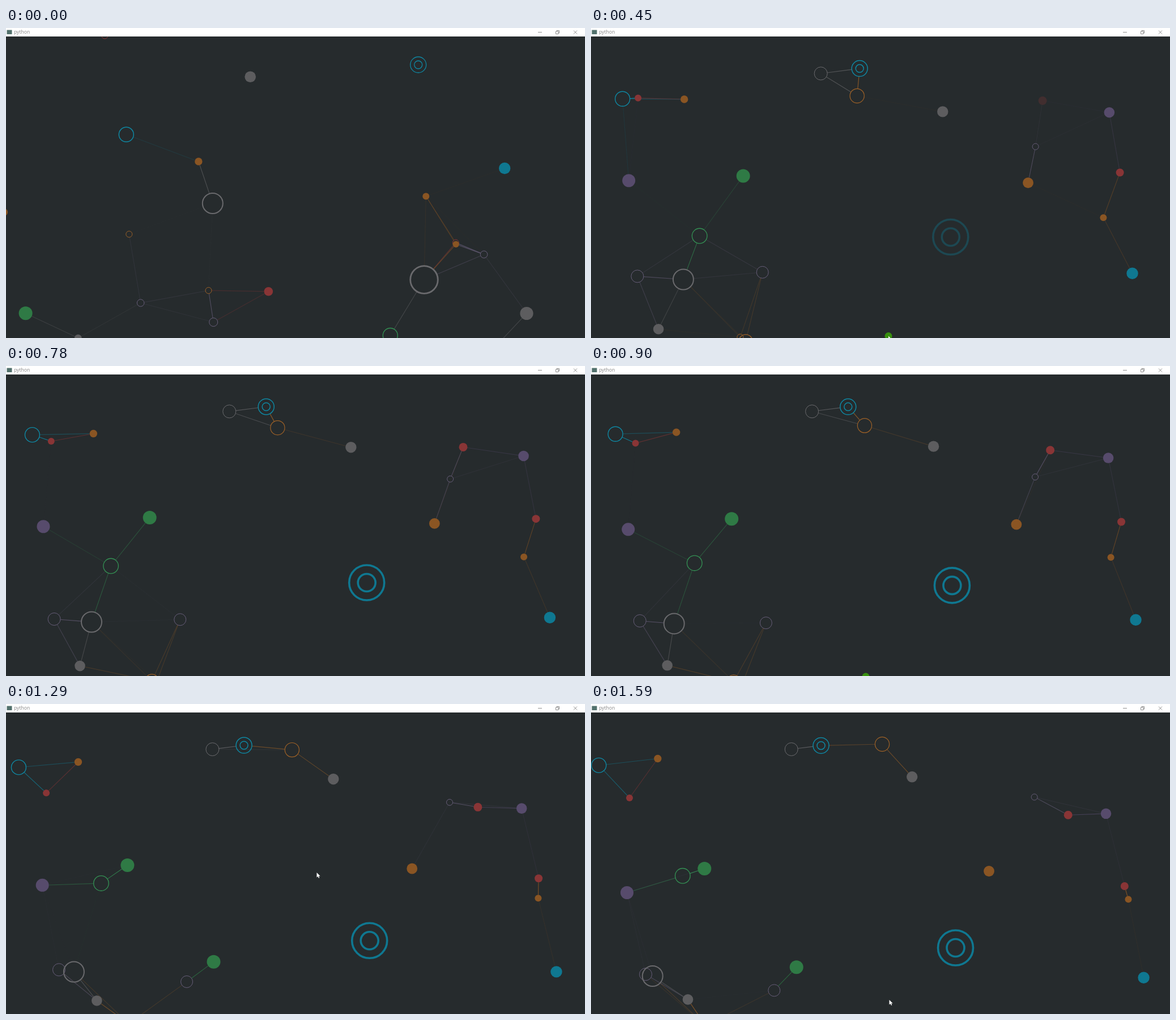
Animation of 1022 by 548 pixels, one loop 1620 ms. Source, as an HTML page with a canvas:

```html
<!DOCTYPE html>
<html lang="en">
<head>
<meta charset="utf-8">
<title>python</title>
<style>
  html, body { margin: 0; width: 100%; height: 100%; overflow: hidden; background: #262b2d; }
  canvas { position: absolute; left: 0; top: 0; }
  .bar { position: absolute; left: 0; top: 0; width: 1022px; height: 15px; background: #fff; }
  .bar span { position: absolute; left: 14px; top: 1px; font: 8.6px/13px "Open Sans", "Noto Sans", sans-serif; color: #858585; }
  .bar svg { position: absolute; left: 0; top: 0; }
</style>
</head>
<body>
<canvas id="stage" width="1022" height="548"></canvas>
<div class="bar">
  <svg width="1022" height="15" fill="none" stroke="#858585" stroke-width="0.9">
    <rect x="1.5" y="3.5" width="9" height="7.5" fill="#52716c" stroke="none"/>
    <path d="M939 7.5h7M970.5 6h4.5v4.5h-4.5zM972 6v-1.5h4.5v4.5h-1.5M1002 4.5l6 6M1008 4.5l-6 6"/>
  </svg>
  <span>python</span>
</div>
<script>
const ctx = document.getElementById('stage').getContext('2d');
const LOOP = 1620, STEP = 30, SPAN = 59.7, REACH = 138, CUT = 90;
const C = {
  grey: '#5d5d5f', ring: '#6a6a6d', purple: '#574b6c', violet: '#665d78', blue: '#0f7891',
  cyan: '#0f87a2', orange: '#8a5523', amber: '#9d6127', red: '#893536', green: '#2f7a45', mint: '#349154'
};

// w = 0 is a disc, otherwise the ring's line width; links take the colour of the earlier dot
const dot = (c, r, w, x0, y0, x1, y1, more) =>
  ({ c: C[c], r, w, x0, y0, vx: (x1 - x0) / SPAN, vy: (y1 - y0) / SPAN, from: -99, to: 99, ...more });
const drift = (c, r, w, x, y, vx = 0, vy = 0) => dot(c, r, w, x, y, x + vx * SPAN, y + vy * SPAN);

const intro = [
  drift('orange', 6, 0, 741.3, 297.4, .88, .2),
  drift('red', 7.8, 0, 463.3, 465.8),
  drift('grey', 6.3, 0, 127.3, 548),
  drift('ring', 18, 2, 364.8, 310, -1.09, .73),
  drift('cyan', 13, 1.5, 212.3, 188.3, -.84, -.34),
  drift('orange', 6.7, 0, 339.9, 236, -.94, -.59),
  drift('violet', 6.3, 1, 843.6, 400.3),
  drift('violet', 6.3, 1, 237.6, 486),
  drift('violet', 7.5, 1, 366.2, 520),
  drift('amber', 5.5, 1, 357.5, 464),
  drift('amber', 5.5, 1, 217.3, 364.5, .24, 1.03),
  drift('red', 5.5, 1, 793.8, 379.5, -.04, -.9),
  drift('orange', 5.7, 0, 794.2, 382.2),
  drift('ring', 24.3, 2.8, 738, 445),
  drift('mint', 13, 1.3, 678.3, 543.5),
  drift('grey', 11.6, 0, 919, 504.5),
  drift('grey', 6, 0, 865, 562),
  drift('green', 12, 0, 34.6, 504.3),
  drift('grey', 9.8, 0, 431.2, 86.2),
  drift('blue', 10.2, 0, 880.2, 248, .4, 1),
  drift('orange', 6.5, 0, -3.3, 325.6),
  drift('red', 5.5, 1, 174.3, 13.5),
  { ...drift('cyan', 14, 1.3, 727.7, 65, -1.36, .04), inner: 7 }
];

const main = [
  dot('ring', 11.5, 1, 415.8, 80.5, 353.7, 80),
  dot('amber', 12, 1.3, 287, 551, 202, 568),
  dot('amber', 5.5, 1, 261, 536.5, 275.5, 598, { to: 28 }),
  dot('green', 12, 0, 384.8, 409.7, 362.7, 465.3, { from: 28 }),
  dot('violet', 11, 1, 79, 431.3, 96.5, 477.8),
  dot('violet', 10.5, 1, 298.7, 417.3, 323.3, 506.3),
  dot('mint', 13.3, 1.3, 197.5, 380, 161.8, 303.8),
  dot('cyan', 13, 1.4, 63.8, 128.6, 13.8, 108.4),
  dot('purple', 11.5, 0, 67.3, 257.3, 63.5, 333.5),
  dot('red', 6, 0, 86, 115.5, 68, 166),
  dot('orange', 6.7, 0, 173.8, 131.7, 117.8, 96.5),
  dot('amber', 12.6, 1.2, 461, 129.5, 514, 71),
  dot('cyan', 14, 1.5, 487.5, 71.2, 406, 73.4, { inner: 7 }),
  dot('grey', 9.7, 0, 631.3, 151.6, 566.7, 128.8),
  dot('green', 12, 0, 282, 255.7, 200.3, 291),
  dot('violet', 5.5, 1, 785, 218.5, 782.6, 164.5),
  dot('purple', 9.3, 0, 916, 140.5, 909, 193.8),
  dot('orange', 6, 0, 895.8, 333.2, 948.5, 345.3),
  dot('orange', 9.4, 0, 785, 269.4, 702.5, 295.5),
  dot('red', 7, 0, 932, 242.6, 941.8, 322),
  dot('blue', 10.2, 0, 951.6, 424, 975.6, 483.7),
  dot('red', 7.5, 0, 788.3, 115.3, 842.2, 196.3, { from: 7 }),
  dot('blue', 31, 3.6, 633.1, 357.5, 643.5, 431, { from: 6, inner: 15.5, alone: true }),
  dot('grey', 9.3, 0, 109, 534.2, 171, 522.4),
  dot('ring', 18, 2, 173.5, 437.4, 108.7, 481),
  dot('ring', 5.5, 1, -3, 395, -63, 395, { to: 2 }),
  dot('grey', 6, 0, 962, 560, 970, 610, { to: 5 })
];

const clamp = v => Math.max(0, Math.min(1, v));

// piecewise linear through [time, ...values]
function along(keys, t) {
  let i = 0;
  while (i < keys.length - 2 && t >= keys[i + 1][0]) i++;
  const a = keys[i], b = keys[i + 1], k = (t - a[0]) / (b[0] - a[0]);
  return a.slice(1).map((v, n) => v + (b[n + 1] - v) * k);
}

const before = [[180, 0], [450, 9.75], [630, 15.75], [900, 24.7]];
const after = [[1290, 49.4], [1590, 59.7]];

function circle(x, y, r, w) {
  ctx.beginPath();
  ctx.arc(x, y, r, 0, 7);
  if (w) { ctx.lineWidth = w; ctx.stroke(); } else ctx.fill();
}

function scene(dots, u) {
  const live = dots.filter(d => u >= d.from && u < d.to).map(d => ({
    ...d, x: d.x0 + d.vx * u, y: d.y0 + d.vy * u, a: clamp((u - d.from) / 10)
  }));
  live.forEach((p, i) => {
    for (const q of live.slice(i + 1)) {
      if (p.alone || q.alone) continue;
      const dx = q.x - p.x, dy = q.y - p.y, d = Math.hypot(dx, dy), gap = d - p.r - q.r;
      if (gap <= 0 || gap >= REACH) continue;
      ctx.globalAlpha = (1 - gap / REACH) * p.a * q.a;
      ctx.strokeStyle = p.c;
      ctx.lineWidth = 1.1;
      ctx.beginPath();
      ctx.moveTo(p.x + dx / d * p.r, p.y + dy / d * p.r);
      ctx.lineTo(q.x - dx / d * q.r, q.y - dy / d * q.r);
      ctx.stroke();
    }
  });
  for (const p of live) {
    ctx.globalAlpha = p.a;
    ctx.fillStyle = ctx.strokeStyle = p.c;
    circle(p.x, p.y, p.r, p.w);
    if (p.inner) circle(p.x, p.y, p.inner, p.w);
  }
  ctx.globalAlpha = 1;
}

const mouse = [[390, 532, 560], [450, 525, 544.5], [540, 500, 556], [630, 489, 546.5], [870, 485, 549],
  [930, 485, 549], [960, 485, 570], [1140, 520, 565], [1260, 548.5, 298], [1320, 548.5, 298], [1590, 526.5, 523]];

function pointer(t) {
  if (t < 390) return;
  const [x, y] = along(mouse, t);
  if (Math.abs(t - 450) <= 30 || Math.abs(t - 900) <= 30) {
    ctx.fillStyle = '#38900f';
    circle(x, y, 6.5, 0);
  }
  ctx.save();
  ctx.translate(x, y);
  ctx.fillStyle = '#fff';
  ctx.fill(new Path2D('M0 0V8.6L2 6.8L3.4 9.8L4.8 9.2L3.5 6.2H6.2Z'));
  ctx.restore();
}

function frame(now) {
  const t = Math.floor(now % LOOP / STEP) * STEP;
  ctx.fillStyle = '#262b2d';
  ctx.fillRect(0, 0, 1022, 548);
  if (t < CUT) scene(intro, t / STEP);
  else scene(main, along(t < 990 ? before : after, t)[0]);
  pointer(t);
  requestAnimationFrame(n => frame(n - start));
}
const start = performance.now();
frame(0);
</script>
</body>
</html>
```
